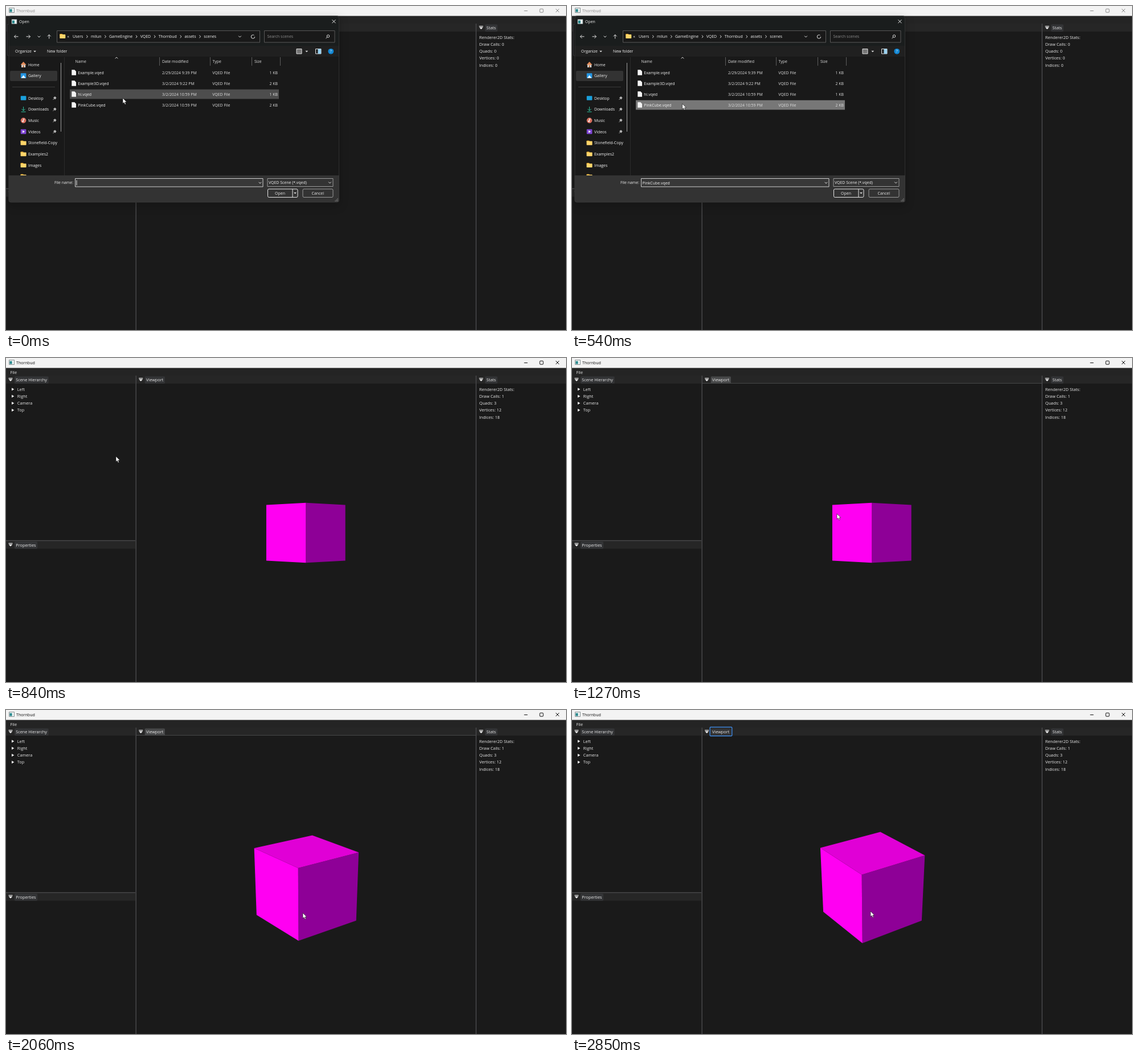
An HTML page with a canvas for the animation above (2.87 s loop, 983 px wide and 570 px high).

```html
<!DOCTYPE html>
<html lang="en">
<head>
<meta charset="utf-8">
<title>Scene editor</title>
<style>
html, body { margin: 0; width: 100%; height: 100%; overflow: hidden; background: #1a1a1a; }
canvas { display: block; width: 983px; height: 570px; }
</style>
</head>
<body>
<canvas id="stage" width="983" height="570"></canvas>
<script>
const W = 983, H = 570, LOOP = 2870;
const PICK = 540, CLOSE = 690, LOAD = 840, ZOOM = 1270, DRAG = 1920, DROP = 2310, BLUR = 2850;
const APP = 'Thornbud', KIND = 'VQED', EXT = '.vqed';
const UI = '#e8e8e8', INK = '#e0e0e0', LINE = '#5a5a5c', ROW = 12.25;

const stage = document.getElementById('stage').getContext('2d');
const layer = document.createElement('canvas');
layer.width = W;
layer.height = H;
const layerCtx = layer.getContext('2d');
let g = stage;

// Pointer path: time, x, y
const PATH = [
  [0, 205, 162], [270, 194, 171], [880, 193, 173], [1140, 441, 257], [ZOOM, 465, 274],
  [1660, 486, 289], [DRAG, 534, 319], [2050, 521, 357], [DROP, 517, 367], [2700, 517, 367], [2830, 524, 354]
];

const held = t => t < LOAD ? t - t % 135 : t - (t - 880) % 130;

function pointerAt(t) {
  const i = PATH.findLastIndex(k => k[0] <= t);
  const [t0, x0, y0] = PATH[i];
  const [t1, x1, y1] = PATH[i + 1] || [LOOP, x0, y0];
  const u = (t - t0) / (t1 - t0);
  return [x0 + (x1 - x0) * u, y0 + (y1 - y0) * u];
}

function cameraAt(t) {
  const u = Math.min(1, Math.max(0, (t - ZOOM) / (1660 - ZOOM)));
  const dist = 10 - 2.32 * (1 - (1 - u) ** 2);
  if (t < DRAG) return [dist, 0, 0];
  const [x, y] = pointerAt(Math.min(t, DROP));
  const [ox, oy] = pointerAt(DRAG);
  return [dist, (y - oy) * 0.57, (x - ox) * 0.59];
}

function box(x, y, w, h, fill, stroke, r = 0, lw = 1) {
  g.beginPath();
  g.roundRect(x, y, w, h, r);
  if (fill) { g.fillStyle = fill; g.fill(); }
  if (stroke) { g.strokeStyle = stroke; g.lineWidth = lw; g.stroke(); }
}

function trace(p) {
  g.beginPath();
  for (let i = 0; i < p.length; i += 2) g.lineTo(p[i], p[i + 1]);
}

function poly(fill, ...p) {
  trace(p);
  g.fillStyle = fill;
  g.fill();
}

function line(color, ...p) {
  trace(p);
  g.strokeStyle = color;
  g.lineWidth = 1;
  g.stroke();
}

function ring(x, y, r, color, end = 7) {
  g.beginPath();
  g.arc(x, y, r, 0, end);
  g.strokeStyle = color;
  g.lineWidth = 1;
  g.stroke();
}

const disc = (x, y, r, fill) => box(x - r, y - r, 2 * r, 2 * r, fill, null, r);

function at(x, y, paint, turn = 0) {
  g.save();
  g.translate(x, y);
  g.rotate(turn);
  paint();
  g.restore();
}

// y is the middle of the capitals
function text(s, x, y, color = UI, size = 7.3, align = 'left') {
  g.font = size + 'px "Open Sans", "Noto Sans", sans-serif';
  g.textAlign = align;
  g.fillStyle = color;
  g.fillText(s, x, y + size * 0.36);
}

const label = (s, x, y, color = '#f2f2f2', align) => text(s, x, y, color, 6.95, align);

function cross(x, y, color) {
  line(color, x - 3, y - 3, x + 3, y + 3);
  line(color, x - 3, y + 3, x + 3, y - 3);
}

const chevron = (x, y, turn = 0) => at(x, y, () => line(INK, -2.3, -1.2, 0, 1.2, 2.3, -1.2), turn);
const caret = (x, y) => poly(INK, x - 2.4, y - 1.2, x + 2.4, y - 1.2, x, y + 1.3);

const arrow = (x, y, turn, color = INK) => at(x, y, () => {
  line(color, 3.5, 0, -3.5, 0);
  line(color, -0.5, -3, -3.5, 0, -0.5, 3);
}, turn);

function appIcon(x, y) {
  box(x, y, 9, 8, '#eef3f3', '#70797c', 0, 0.8);
  box(x + 1, y + 2, 4, 5, '#23868a');
}

function titleBar(active) {
  const ink = active ? '#111' : '#8c8c8c';
  box(0, 0, W, 17.5, '#f3f3f3');
  appIcon(5.5, 3.5);
  text(APP, 18, 8.5, ink, 7.1);
  line(ink, 909.5, 8.5, 915.5, 8.5);
  box(937, 5.2, 6, 6, null, ink, 1);
  cross(968, 8, ink);
}

function panel(title, x, y, w, focus) {
  box(x, y, w, 14, '#262626');
  box(x + 4.5, y + 4, 7, 1.2, '#f4f4f4');
  poly('#f4f4f4', x + 4.5, y + 6.2, x + 11.5, y + 6.2, x + 8, y + 10);
  g.font = '7.3px "Open Sans", "Noto Sans", sans-serif';
  box(x + 15, y + 1.5, g.measureText(title).width + 5, 12.5, focus ? '#474849' : '#333436', null, 1.5);
  text(title, x + 17.3, y + 7.5);
  if (focus) box(x, y + 13, w, 1, '#474849');
}

function editor(t) {
  const loaded = t >= LOAD, quads = loaded ? 3 : 0;
  box(0, 0, W, H, '#1a1a1a');
  box(0, 17.5, W, 14, '#242424');
  titleBar(t >= CLOSE);
  text('File', 7.5, 25);
  panel('Scene Hierarchy', 0, 31, 227);
  panel('Properties', 0, 321.5, 227);
  panel('Viewport', 228.7, 31, 596, t >= ZOOM && t < BLUR);
  panel('Stats', 826, 31, 157);
  for (const x of [227.6, 824.6]) box(x, 31, 1.1, H, LINE);
  box(0, 320.8, 227, 1, LINE);
  ['Renderer2D Stats:', 'Draw Calls: ' + Math.sign(quads), 'Quads: ' + quads, 'Vertices: ' + quads * 4, 'Indices: ' + quads * 6]
    .forEach((s, i) => text(s, 830.7, 55 + i * ROW));
  if (!loaded) return fileMenu();
  ['Left', 'Right', 'Camera', 'Top'].forEach((s, i) => {
    const y = 55 + i * ROW;
    poly('#f4f4f4', 10, y - 2.6, 14.4, y, 10, y + 2.6);
    text(s, 19.8, y);
  });
  if (t >= BLUR) box(242.2, 30.2, 38.6, 15.4, null, '#4296fa', 1, 1.2);
}

function fileMenu() {
  box(2.5, 32.5, 101, 54.5, '#161617', '#3c3c42');
  box(4, 48, 98, 12, '#38393b');
  [['New', 'Ctrl+N'], ['Open...', ''], ['Save As...', 'Ctrl+Shift+S'], ['Exit', '']].forEach(([s, key], i) => {
    text(s, 6.7, 42 + i * ROW);
    text(key, 43, 42 + i * ROW, '#808080');
  });
}

// Unit cube under a 30 degree perspective camera
function cube(dist, pitch, yaw) {
  const rad = Math.PI / 180, cp = Math.cos(pitch * rad), sp = Math.sin(pitch * rad);
  const corner = (turn, up) => {
    const a = (yaw + turn) * rad, x = Math.SQRT1_2 * Math.sin(a), z = Math.SQRT1_2 * Math.cos(a);
    const k = 981 / (dist - z * cp - up * sp);
    return [526.3 + x * k, 307.5 - (up * cp - z * sp) * k];
  };
  const side = (a, b, color) =>
    poly(color, ...corner(a, 0.5), ...corner(b, 0.5), ...corner(b, -0.5), ...corner(a, -0.5));
  side(0, 90, '#8e0097');
  side(-90, 0, '#ff00f2');
  if (pitch) poly('#e000d6', ...[-90, 180, 90, 0].flatMap(a => corner(a, 0.5)));
}

// Sidebar icons, drawn around their centre
const tile = color => box(-4.8, -4.3, 9.6, 8.6, color, null, 1);
const folder = () => {
  box(-5, -4, 5, 3, '#e0a52c', null, 0.8);
  box(-5, -2.9, 10, 6.9, '#ffd56a', null, 0.8);
};
const home = () => {
  box(-3.5, -1, 7, 6, '#d9d9d9');
  poly('#e58b58', -5, 0.5, 0, -5, 5, 0.5);
  box(-1, 1.5, 2.2, 3.5, '#b06a3a');
};
const gallery = () => {
  tile('#2496e4');
  poly('#e8f5ff', -4, 4, 0, -1, 4, 4);
};
const desktop = () => box(-4.8, -3.8, 9.6, 7.6, '#1aa0dc', null, 1);
const download = () => {
  arrow(0, -1, -Math.PI / 2, '#30c7a4');
  line('#30c7a4', -4, 4.5, 4, 4.5);
};
const music = () => {
  disc(0, 0, 4.8, '#d8705f');
  disc(-1, 1.5, 1.3, '#fff');
  line('#fff', 0, 1.5, 0, -2.8, 2, -2);
};
const video = () => {
  tile('#7d45d2');
  poly('#fff', -1.5, -2.3, 2.5, 0, -1.5, 2.3);
};
const pin = () => {
  line('#b8b8b8', -3, 3, -0.5, 0.5);
  poly('#b8b8b8', -2.5, -0.8, 0.5, -3, 3, -0.5, 0.8, 2.5);
};

function sidebar() {
  box(7, 114, 83, 18, '#333', null, 2);
  box(11, 142, 75, 1, '#3a3a3a');
  box(96, 100, 1, 121, '#a0a0a0');
  box(102, 90, 1, 208, '#2b2b2b');
  g.save();
  g.beginPath();
  g.rect(5, 90, 86, 208);
  g.clip();
  const items = [
    ['Home', home], ['Gallery', gallery], null, ['Desktop', desktop], ['Downloads', download], ['Music', music],
    ['Videos', video], ['Stonefield-Copy', folder], ['Examples2', folder], ['Images', folder], ['', folder]
  ];
  items.forEach((item, i) => {
    if (!item) return;
    const y = 103 + i * 19.67;
    at(30.6, y, item[1]);
    label(item[0], 39, y);
    if (i > 2 && i < 7) at(85.5, y, pin);
  });
  g.restore();
}

function fileList(t, pointerY) {
  const soft = '#dedede';
  [['Name', 121.5], ['Date modified', 274], ['Type', 362.5], ['Size', 436], ['', 485.5]].forEach(([s, x], i) => {
    label(s, x, 97.7, soft);
    if (i) box(Math.round(x - 4.7), 90, 1, 15, '#5c5c5c');
  });
  chevron(194, 91.3, Math.PI);
  const files = [
    ['Example', '2/29/2024 9:39 PM', 1], ['Example3D', '3/2/2024 9:22 PM', 2],
    ['hi', '3/2/2024 10:59 PM', 1], ['PinkCube', '3/2/2024 10:59 PM', 2]
  ];
  files.forEach(([name, date, kb], i) => {
    const y = 117.2 + i * 19;
    if (Math.abs(pointerY - y) < 7) box(112, y - 8.4, 367, 16.8, t >= PICK ? '#777' : '#4d4d4d');
    poly('#f4f4f4', 115.3, y - 5, 120.3, y - 5, 123, y - 2.3, 123, y + 4.6, 115.3, y + 4.6);
    label(name + EXT, 126.3, y);
    label(date, 274, y, soft);
    label(KIND + ' File', 362.3, y, soft);
    label(kb + ' KB', 477, y, soft, 'right');
  });
}

function addressBar() {
  arrow(18, 53.8, 0);
  arrow(39, 53.8, Math.PI);
  chevron(58, 53.8);
  arrow(75.7, 54, Math.PI / 2);
  box(89.5, 43.5, 356, 20.5, '#191919', '#585858');
  box(453.5, 43.5, 123.5, 20.5, '#191919', '#585858');
  at(99.3, 53, folder);
  label('«', 107.5, 53);
  let x = 117;
  for (const s of ['Users', 'milun', 'GameEngine', KIND, APP, 'assets', 'scenes']) {
    if (x > 117) chevron(x - 6.7, 53.8, -Math.PI / 2);
    label(s, x, 53.5);
    x += g.measureText(s).width + 13.6;
  }
  chevron(410.5, 53.8);
  ring(433.5, 54, 3.2, INK, 5.4);
  label('Search scenes', 458.5, 53.5, '#8d8d8d');
  ring(565.5, 53, 2.2, INK);
  line(INK, 564, 54.6, 561.5, 57);
}

function toolbar() {
  label('Organize', 16, 79.7);
  caret(50.6, 79.9);
  label('New folder', 72, 79.7);
  box(510, 75.5, 9, 8.5, '#777', INK);
  caret(527.8, 79.9);
  box(543.5, 75.5, 9.5, 8.5, null, INK);
  box(547.5, 75.5, 5.5, 8.5, '#9bd2f0');
  disc(570.3, 79.8, 4.9, '#1287d4');
  label('?', 570.3, 79.8, '#fff', 'center');
}

function footer(t) {
  label('File name:', 118, 310.7, UI, 'right');
  box(121.5, 303.5, 329.5, 14.5, '#383838', '#cfcfcf');
  if (t >= PICK) label('PinkCube' + EXT, 123.5, 311);
  else box(123.5, 306.5, 1, 9, '#f0f0f0');
  chevron(446, 311);
  box(459, 303.5, 115, 14, '#333', '#9a9a9a');
  label(KIND + ' Scene (*' + EXT + ')', 461, 310.7);
  chevron(568.5, 310.7);
  box(459.5, 322, 52.5, 14.5, '#333', '#e6e6e6', 2);
  box(502.5, 322, 1, 14.5, '#e6e6e6');
  label('Open', 481, 329, UI, 'center');
  caret(507.5, 329.3);
  box(521, 322, 53, 14.5, '#333', '#9a9a9a', 2);
  label('Cancel', 547.3, 329, UI, 'center');
  for (let i = 0; i < 3; i++)
    for (let j = 0; j <= i; j++) box(581.5 - j * 2, 338.5 + i * 2, 1.1, 1.1, '#a8a8a8');
}

function dialog(t, pointerY) {
  const closing = t >= CLOSE;
  g = layerCtx;
  g.clearRect(0, 0, W, H);
  g.save();
  g.beginPath();
  g.roundRect(4.5, 17.5, 580.5, 328, 4);
  g.clip();
  box(0, 0, W, H, '#191919');
  box(0, 17, W, 53, '#1a1d1d');
  box(0, 70, W, 19, '#202020');
  box(0, 298, W, 50, '#333');
  g.restore();
  box(5, 18, 579.5, 327, null, '#3c3c3c', 4, 0.7);
  if (!closing) appIcon(10, 23.5);
  label('Open', closing ? 10.5 : 23, 27.5);
  cross(575.5, 27.2, '#eee');
  addressBar();
  toolbar();
  sidebar();
  fileList(t, pointerY);
  footer(t);

  g = stage;
  g.save();
  if (closing) {
    g.globalAlpha = 0.7;
    g.translate(244, 167);
    g.scale(0.982, 0.982);
    g.translate(-244, -167);
  }
  g.shadowColor = 'rgba(0,0,0,.22)';
  g.shadowBlur = 16;
  g.shadowOffsetY = 5;
  g.drawImage(layer, 0, 0);
  g.restore();
}

function pointer() {
  poly('#fff', 0, 0, 0, 9.6, 2.2, 7.6, 3.8, 11.2, 5.4, 10.4, 3.9, 7, 6.9, 7);
  g.closePath();
  g.strokeStyle = '#111';
  g.lineWidth = 0.6;
  g.stroke();
}

function draw(t) {
  const beat = held(t), [x, y] = pointerAt(beat);
  editor(t);
  if (t >= LOAD) cube(...cameraAt(beat));
  else dialog(t, y);
  at(x, y, pointer);
}

const start = performance.now();
function tick() {
  draw((performance.now() - start) % LOOP);
  requestAnimationFrame(tick);
}
tick();
</script>
</body>
</html>
```
